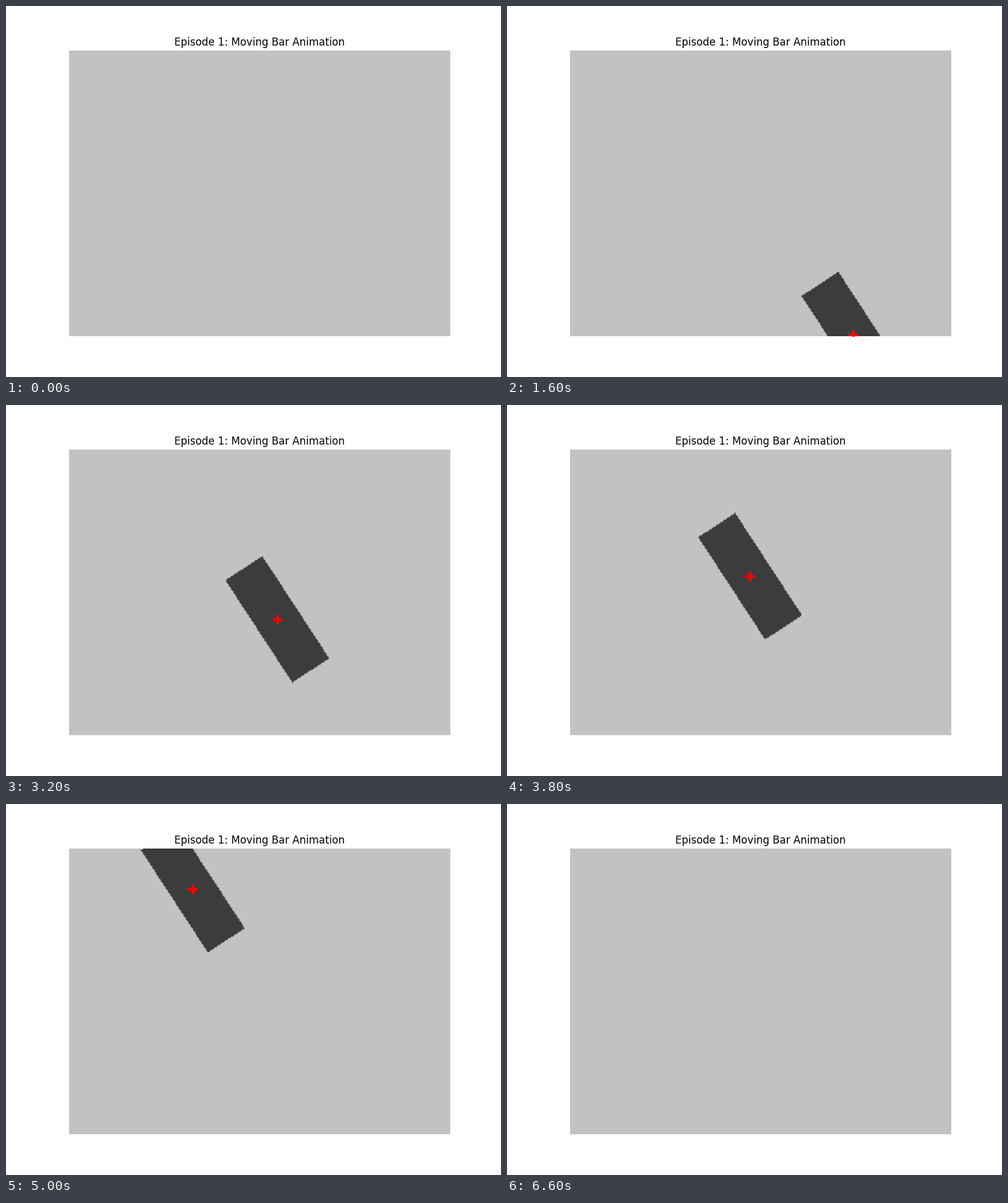
A matplotlib script for the animation above (7200 ms loop, 800 by 600 pixels).

```python
import numpy as np
import matplotlib.pyplot as plt
from matplotlib.animation import FuncAnimation

WIDTH, HEIGHT = 320, 240
FRAMES, INTERVAL = 36, 200
BACKGROUND, BAR = 194, 60
LENGTH, THICKNESS = 102.6, 37.0
STEP = np.array([-7.88, -12.05])  # displacement per frame
MID_FRAME = 17.88  # when the bar crosses the centre

cols, rows = np.meshgrid(np.arange(WIDTH) + 0.5, np.arange(HEIGHT) + 0.5)
ux, uy = STEP / np.hypot(*STEP)


def bar_center(frame):
    return np.array([WIDTH, HEIGHT]) / 2 + STEP * (frame - MID_FRAME)


def render(cx, cy):
    """Rasterise a bar aligned with its direction of travel."""
    dx, dy = cols - cx, rows - cy
    along = np.abs(dx * ux + dy * uy)
    across = np.abs(dx * uy - dy * ux)
    inside = (along <= LENGTH / 2) & (across <= THICKNESS / 2)
    return np.where(inside, BAR, BACKGROUND).astype(np.uint8)


fig, ax = plt.subplots(figsize=(8, 6), dpi=100)
ax.set_title("Episode 1: Moving Bar Animation")
ax.axis("off")

start = bar_center(0)
image = ax.imshow(render(*start), cmap="gray", vmin=0, vmax=255,
                  extent=(0, WIDTH, HEIGHT, 0))
cross, = ax.plot([start[0]], [start[1]], "r+", markersize=12, markeredgewidth=3)
ax.set_xlim(0, WIDTH)
ax.set_ylim(HEIGHT, 0)


def update(frame):
    cx, cy = bar_center(frame)
    image.set_data(render(cx, cy))
    cross.set_data([cx], [cy])
    return image, cross


anim = FuncAnimation(fig, update, frames=FRAMES, interval=INTERVAL,
                     repeat=True, repeat_delay=0)
plt.show()
```
